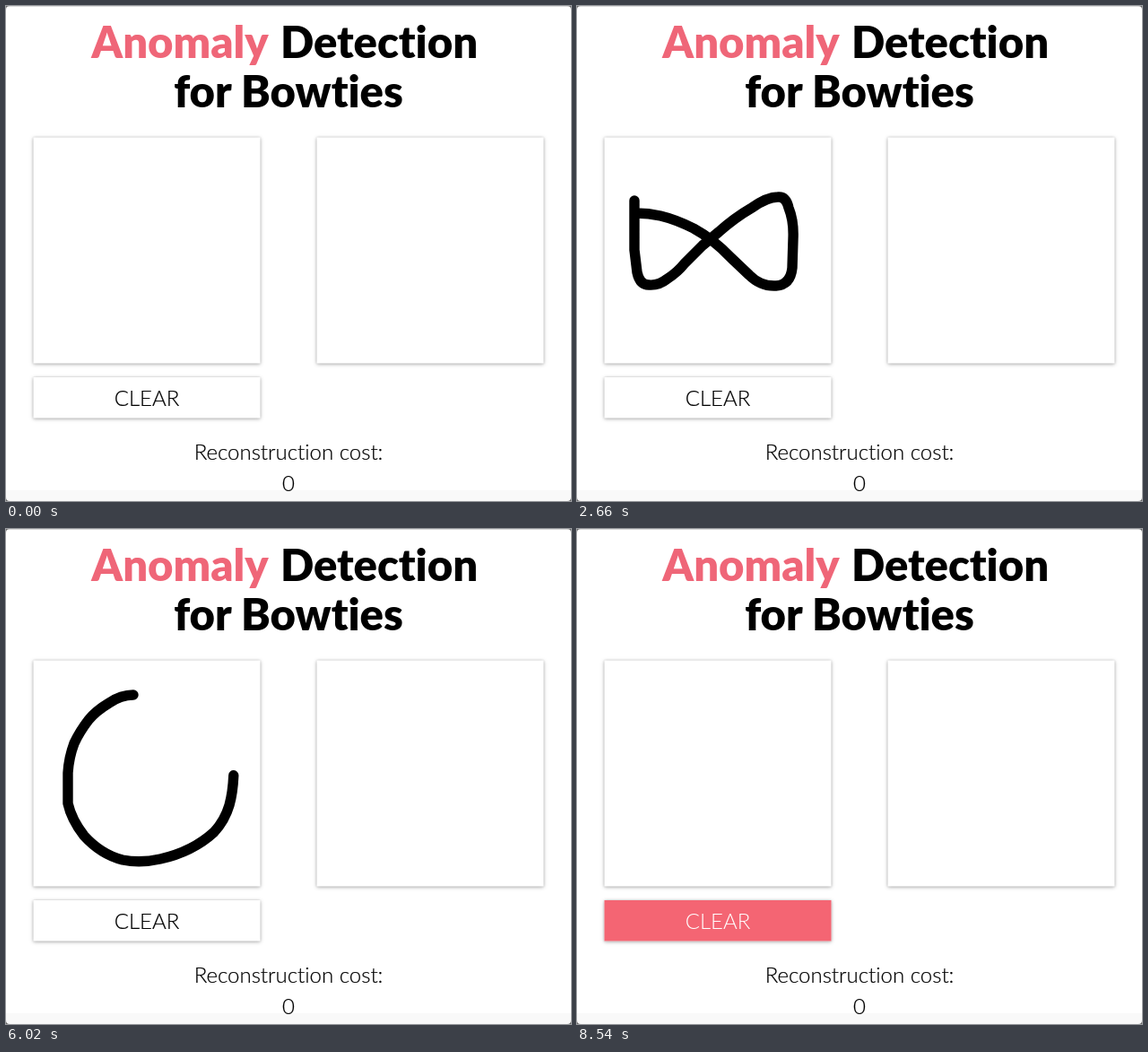
Write an HTML page that moves like this. It is 630 by 552 pixels and loops after 8610 ms.

```html
<!DOCTYPE html>
<html lang="en">
<head>
<meta charset="utf-8">
<title>Anomaly Detection for Bowties</title>
<style>
  html, body { margin: 0; width: 100%; height: 100%; overflow: hidden; background: #fff; }
  svg { display: block; width: 630px; height: 552px; }
  text { font: 300 24px Lato, sans-serif; font-variant-ligatures: none; text-anchor: middle; fill: #000; }
  .label { stroke: #000; stroke-width: .2; }
  .title { font-weight: 900; font-size: 49px; }
  .title.pink { fill: #ef6678; }
  .panel { fill: #fff; filter: drop-shadow(0 1px 2px rgba(0, 0, 0, .28)) drop-shadow(0 0 1px rgba(0, 0, 0, .15)); }
  .pen { fill: none; stroke: #000; stroke-width: 11.4; stroke-linecap: round; stroke-linejoin: round; stroke-dasharray: 1 2; }
  .smear { fill: none; stroke-linecap: round; stroke-linejoin: round; }
  filter { color-interpolation-filters: sRGB; }

  /* One 8610 ms loop in 70 ms ticks; the small lead keeps changes ahead of each tick. */
  .anim { animation: 8610ms step-end -10ms infinite; }
  .show-a { animation-name: show-a; }
  .show-b { animation-name: show-b; }
  .draw-a { animation-name: draw-a; }
  .draw-b { animation-name: draw-b; }
  .result-a { animation-name: result-a; }
  .result-b { animation-name: result-b; }
  .zero { animation-name: zero; }
  .hover { animation-name: hover; }

  @keyframes show-a { 0% { opacity: 0 } .813% { opacity: 1 } 45.528%, 100% { opacity: 0 } }
  @keyframes show-b { 0% { opacity: 0 } 55.285% { opacity: 1 } 94.309%, 100% { opacity: 0 } }
  @keyframes result-a { 0% { opacity: 0 } 31.707% { opacity: 1 } 45.528%, 100% { opacity: 0 } }
  @keyframes result-b { 0% { opacity: 0 } 78.049% { opacity: 1 } 94.309%, 100% { opacity: 0 } }
  @keyframes zero {
    0% { opacity: 1 } 31.707% { opacity: 0 } 45.528% { opacity: 1 }
    78.049% { opacity: 0 } 94.309%, 100% { opacity: 1 }
  }
  @keyframes draw-a {
    0% { stroke-dashoffset: 1; animation-timing-function: steps(14, end) }
    11.382% { stroke-dashoffset: .693; animation-timing-function: steps(22, end) }
    29.268%, 100% { stroke-dashoffset: 0 }
  }
  @keyframes draw-b {
    0% { stroke-dashoffset: 1 }
    54.472% { stroke-dashoffset: 1; animation-timing-function: steps(5, end) }
    58.537% { stroke-dashoffset: .851; animation-timing-function: steps(21, end) }
    75.61%, 100% { stroke-dashoffset: 0 }
  }
  @keyframes hover {
    0% { opacity: 0 } 39.024% { opacity: .6 } 39.837% { opacity: 1 }
    47.967% { opacity: .6 } 48.78% { opacity: .2 } 49.593% { opacity: 0 }
    87.805% { opacity: .25 } 88.618% { opacity: .8 } 89.431%, 100% { opacity: 1 }
  }
</style>
</head>
<body>
<svg viewBox="0 0 630 552">
  <defs>
    <clipPath id="out"><rect x="346.5" y="146.5" width="253" height="252"/></clipPath>
    <filter id="soft" filterUnits="userSpaceOnUse" x="330" y="130" width="290" height="290"><feGaussianBlur stdDeviation="5"/></filter>
    <filter id="wide" filterUnits="userSpaceOnUse" x="330" y="130" width="290" height="290"><feGaussianBlur stdDeviation="9"/></filter>
  </defs>

  <rect width="630" height="552" fill="#fff"/>
  <rect y="540" width="630" height="12" fill="#f9f9f9"/>
  <path d="M0 .5H630" stroke="#dcdcdc"/>
  <path d="M0 0H4Q0 0 0 4ZM630 0V4Q630 0 626 0ZM0 552V548Q0 552 4 552ZM630 552H626Q630 552 630 548Z" fill="#666"/>

  <text class="title pink" x="194" y="58">Anomaly</text>
  <text class="title" x="416" y="58">Detection</text>
  <text class="title" x="315" y="113">for Bowties</text>

  <rect class="panel" x="30.5" y="146.5" width="253" height="252"/>
  <rect class="panel" x="346.5" y="146.5" width="253" height="252"/>
  <rect class="panel" x="30.5" y="414" width="253" height="45.5"/>
  <text class="label" x="157" y="446">CLEAR</text>
  <g class="anim hover">
    <rect x="30.5" y="414" width="253" height="45.5" fill="#f46573"/>
    <text x="157" y="446" style="fill:#fff">CLEAR</text>
  </g>

  <g class="anim show-a">
    <path class="pen anim draw-a" pathLength="1" d="M64 217V272L67 297Q70 311 80 311Q91 312 101 304Q112 297 120 287L140 267L158 252Q176 236 195 225Q212 213 224 213Q233 212 236 225Q242 240 241 260L240 292Q238 311 222 312Q205 313 192 300L172 281Q152 260 130 248Q110 238 93 234Q80 231 66 231"/>
  </g>
  <g class="anim show-b">
    <path class="pen anim draw-b" pathLength="1" d="M142 185Q128 185 115 194Q100 203 92 213Q82 226 76 239Q70 255 69 272V306Q73 324 87 342Q106 363 130 369Q150 373 172 368Q208 360 232 338Q244 325 249 308Q254 290 254 264Q255 240 248 225Q240 211 214 199Q192 188 180 188H146L140 189"/>
  </g>

  <g class="anim result-a">
    <g class="smear" clip-path="url(#out)">
      <g filter="url(#soft)" fill="#f5f5f7">
        <path d="M410 377L432 352L470 345L492 362L486 380L450 374Z"/>
        <ellipse cx="548" cy="174" rx="12" ry="10"/>
        <ellipse cx="574" cy="190" rx="16" ry="7"/>
        <ellipse cx="517" cy="333" rx="12" ry="8"/>
      </g>
      <g filter="url(#wide)" stroke="#000" stroke-opacity=".24" stroke-width="26">
        <path d="M385 222V310L470 265ZM470 265L518 222M470 265L548 312L564 308V228"/>
      </g>
      <g filter="url(#soft)" stroke="#000">
        <path d="M385 222V308" stroke-opacity=".52" stroke-width="14"/>
        <path d="M388 223L470 263" stroke-opacity=".5" stroke-width="12"/>
        <path d="M470 265L392 311" stroke-opacity=".48" stroke-width="15"/>
        <path d="M472 262L522 219" stroke-opacity=".52" stroke-width="11"/>
        <path d="M480 271L532 306L560 313" stroke-opacity=".48" stroke-width="14"/>
        <path d="M563 228V308" stroke-opacity=".5" stroke-width="15"/>
        <path d="M563 242V282" stroke-opacity=".8" stroke-width="13"/>
        <path d="M465 264H480" stroke-opacity=".3" stroke-width="22"/>
      </g>
    </g>
    <text class="label" x="315" y="541">0.04060</text>
  </g>

  <g class="anim result-b">
    <rect x="346.5" y="146.5" width="253" height="252" fill="#f46573"/>
    <g class="smear" clip-path="url(#out)" stroke="#3a1a20">
      <g filter="url(#wide)">
        <rect x="379" y="170" width="192" height="204" fill="#3a1a20" fill-opacity=".05" stroke="none"/>
        <path d="M387 185V365M566 190V366" stroke-opacity=".13" stroke-width="14"/>
        <path d="M384 359H480" stroke-opacity=".28" stroke-width="24"/>
        <path d="M396 184L432 210M504 206L560 176" stroke-opacity=".14" stroke-width="16"/>
        <path d="M420 300L470 270L530 300M490 340L556 370" stroke-opacity=".1" stroke-width="18"/>
      </g>
      <g filter="url(#soft)">
        <path d="M386 250V294" stroke-opacity=".5" stroke-width="14"/>
        <path d="M563 243V296" stroke-opacity=".26" stroke-width="13"/>
        <path d="M470 272L477 269" stroke-opacity=".95" stroke-width="19"/>
        <path d="M388 173L416 186M394 198L406 192" stroke-opacity=".17" stroke-width="11"/>
        <path d="M374 354L394 362L412 352M440 366L475 358" stroke-opacity=".16" stroke-width="13"/>
        <path d="M494 348L550 371" stroke-opacity=".22" stroke-width="11"/>
      </g>
    </g>
    <text class="label" x="315" y="541">0.08182</text>
  </g>

  <text class="label" x="315" y="506">Reconstruction cost:</text>
  <text class="label anim zero" x="315" y="541">0</text>
</svg>
</body>
</html>
```
